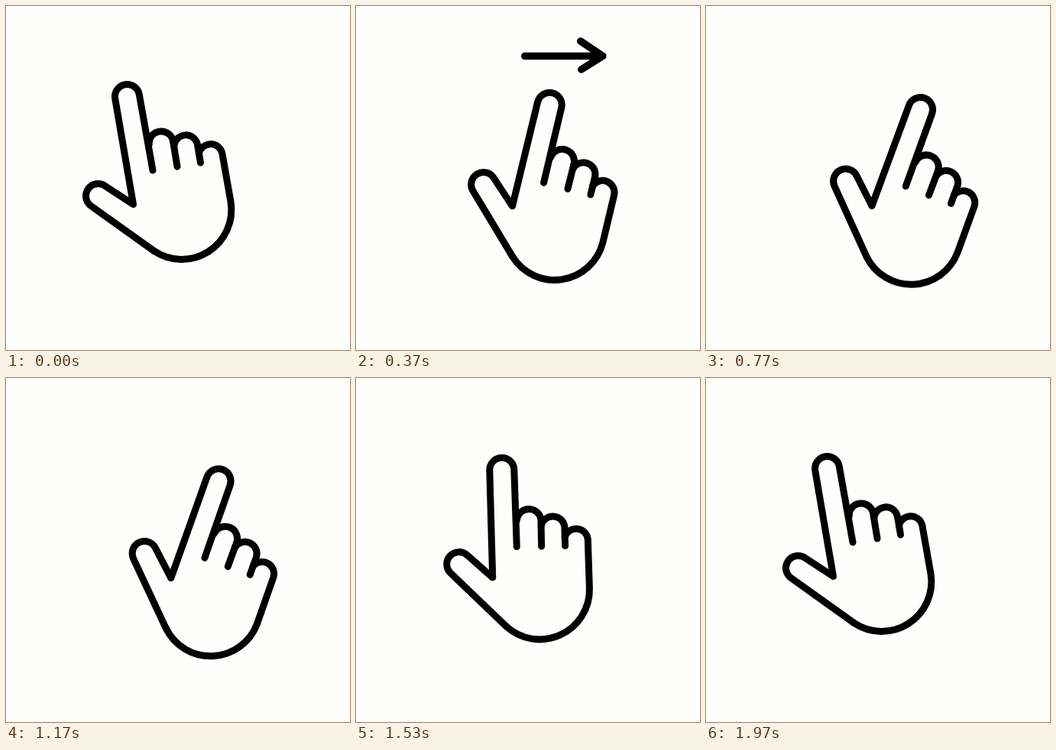
An HTML page for the animation above (2010 ms loop, 450 px wide and 450 px high).

```html
<!DOCTYPE html>
<html lang="en">
<head>
<meta charset="utf-8">
<title>Swipe right</title>
<style>
  html, body { margin: 0; width: 100%; height: 100%; overflow: hidden; background: #fefefc; }
  svg { display: block; width: 100%; height: 100%; }
  path { fill: none; stroke: #000; stroke-width: 9; stroke-linecap: round; stroke-linejoin: round; }
  #arrow path { stroke-width: 9.6; }
</style>
</head>
<body>
<svg viewBox="0 0 450 450">
  <g id="arrow" opacity="0">
    <path d="M-102 65.5H0M-29 46L0 65.5L-28 83"/>
  </g>
  <g id="hand">
    <!-- thumb, index finger -->
    <path d="M193 320L111.3 261.6A16 16 0 0 1 129.7 235.4L166.5 259.5L142.7 121.1A16 16 0 0 1 174.3 115.9L192 215"/>
    <!-- middle and ring fingers -->
    <path d="M187.2 181A15.8 15.8 0 0 1 218.8 178.5L224 210"/>
    <path d="M219.8 183.5A15.5 15.5 0 0 1 250.3 180.5L254.5 205"/>
    <!-- little finger, palm -->
    <path d="M252.4 193.5A15.5 15.5 0 0 1 282.7 192.3L294 256A65 65 0 0 1 193 320"/>
  </g>
</svg>
<script>
  const LOOP = 2010, STEP = 1000 / 30, FRAMES = 60;
  const SWING = 30, PIVOT = "213 212";
  const SHIFT_X = 68, SHIFT_Y = 31.7;
  const TIP_FROM = 148, TIP_TO = 372;

  const hand = document.getElementById("hand");
  const arrow = document.getElementById("arrow");

  const clamp = v => Math.min(1, Math.max(0, v));
  const span = (t, from, to) => clamp((t - from) / (to - from));

  // Bezier easing with handles (a, 0) and (b, 1)
  function ease(x, a, b) {
    let lo = 0, hi = 1;
    for (let i = 0; i < 24; i++) {
      const s = (lo + hi) / 2, r = 1 - s;
      if (3 * a * s * r * r + 3 * b * s * s * r + s * s * s < x) lo = s;
      else hi = s;
    }
    return lo * lo * (3 - 2 * lo);
  }

  function draw(now) {
    const frame = Math.min(FRAMES - 1, Math.floor((now % LOOP + 4) / STEP));
    const t = frame * STEP;
    const out = ease(span(t, 0, 667), 0.333, 0.333);
    const back = ease(span(t, 1000, 2000), 0.77, 0.16);
    const swing = out - back;
    const tip = TIP_FROM + (TIP_TO - TIP_FROM) * out;

    hand.setAttribute("transform",
      `translate(${SHIFT_X * swing} ${SHIFT_Y * swing}) rotate(${SWING * swing} ${PIVOT})`);
    arrow.setAttribute("transform", `translate(${tip} 0)`);
    arrow.setAttribute("opacity", span(t, 100, 200) * (1 - span(t, 600, 734)));
  }

  const start = performance.now();
  function tick() {
    draw(performance.now() - start);
    requestAnimationFrame(tick);
  }
  tick();
</script>
</body>
</html>
```
